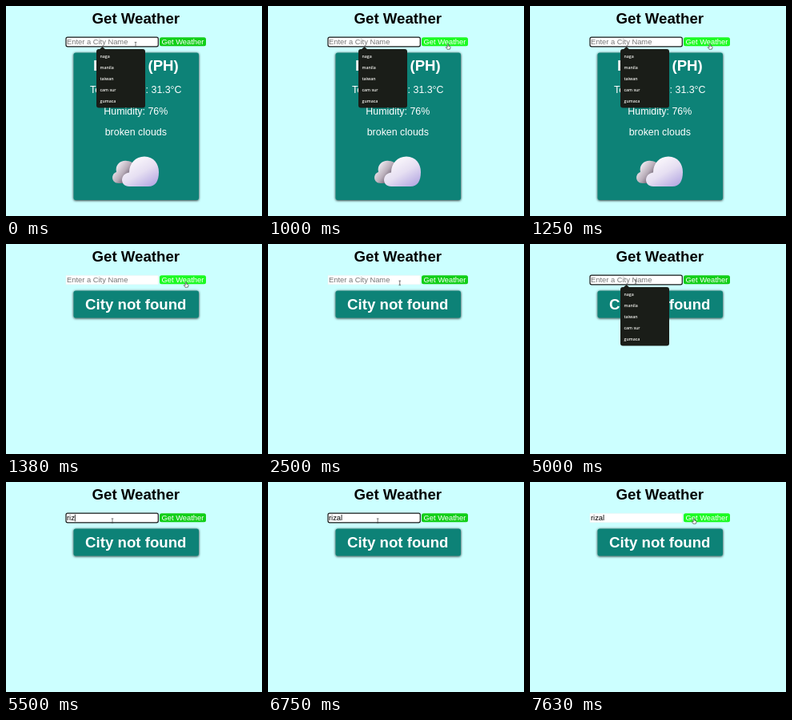
An HTML page for the animation above (8 s loop, 320 px wide and 263 px high).

```html
<!DOCTYPE html>
<html lang="en">
<head>
<meta charset="utf-8">
<title>Get Weather</title>
<style>
  html, body { margin: 0; width: 100%; height: 100%; overflow: hidden; background: #cff; }
  svg { display: block; width: 100vw; height: 100vh; }
  text { font-family: "Liberation Sans", Arial, sans-serif; }
  .big { font-size: 18.67px; font-weight: bold; text-anchor: middle; }
  .mid { font-size: 12.4px; text-anchor: middle; }
  .small { font-size: 9.35px; }
  .light { fill: #fff; }
  .menu { font: 600 5.2px "Open Sans", "Noto Sans", sans-serif; fill: #f4f4f0; }
</style>
</head>
<body>
<svg viewBox="0 0 320 263">
  <defs>
    <filter id="shade" x="-10%" y="-20%" width="120%" height="140%">
      <feDropShadow dx="0" dy="0.6" stdDeviation="1.4" flood-color="#000" flood-opacity="0.9"/>
    </filter>
    <linearGradient id="front" x1="0.1" y1="0" x2="0.85" y2="1">
      <stop offset="0.15" stop-color="#fbf8fc"/>
      <stop offset="0.55" stop-color="#e6dff2"/>
      <stop offset="1" stop-color="#b4a7e2"/>
    </linearGradient>
    <linearGradient id="back" x1="0" y1="0" x2="1" y2="0.7">
      <stop offset="0.2" stop-color="#f1edf3"/>
      <stop offset="0.55" stop-color="#b9adb9"/>
      <stop offset="0.85" stop-color="#594f60"/>
    </linearGradient>
  </defs>
  <rect width="320" height="263" fill="#cff"/>
  <text class="big" x="162.3" y="22.3">Get Weather</text>

  <rect id="card" x="84.5" y="58.5" width="156.5" height="184.5" rx="2.8" fill="#0f8277" filter="url(#shade)"/>
  <g id="weather">
    <text class="big light" x="162.4" y="81.3">Baguio (PH)</text>
    <text class="mid light" x="162.3" y="109.3">Temperature: 31.3°C</text>
    <text class="mid light" x="162.3" y="135.8">Humidity: 76%</text>
    <text class="mid light" x="162.3" y="162.2">broken clouds</text>
    <path fill="url(#back)" d="M141 222 C131 222 131 210 138 208 C136 198 144 193 151 194 C158 194 163 199 163 206 L160 222 Z"/>
    <path fill="url(#front)" d="M154 226 C142 226 142 210 154 208.500 C154 197 162 188.500 173 188.500 C185 188.500 191 198 191 208 C191 219 187 226 178 226 Z"/>
  </g>
  <text id="missing" class="big light" x="162.3" y="82">City not found</text>

  <rect id="field" x="75" y="39.200" width="115.300" height="11.600" fill="#fff"/>
  <text id="entry" class="small" x="76" y="48"></text>
  <rect id="caret" y="40.700" width="0.800" height="8.600"/>
  <rect id="button" x="192" y="39.200" width="58" height="11" rx="2.500"/>
  <text class="small light" x="194.500" y="48">Get Weather</text>

  <g id="menu">
    <path d="M116.500 54.500 l4 -3.600 l4 3.600 z" fill="#1a1d18"/>
    <rect x="113" y="54" width="61" height="73.600" rx="3" fill="#1a1d18"/>
  </g>

  <path id="beam" d="M-1.300 -2.600 H1.300 M0 -2.600 V2.600 M-1.300 2.600 H1.300" fill="none" stroke="#444" stroke-width="0.700"/>
  <path id="hand" d="M-0.800 -3 Q0 -3.700 0.700 -3 V-0.800 L2.600 -0.300 Q3.200 0 3 1 L2.300 3.200 H-1 L-2.700 0.700 Q-2.500 -0.300 -0.800 0.700 Z" fill="#fff" stroke="#222" stroke-width="0.600"/>
</svg>
<script>
const LOOP = 8000, STEP = 125;
const $ = id => document.getElementById(id);
const show = (id, on) => $(id).setAttribute("display", on ? "inline" : "none");
const set = (id, attrs) => {
  for (const key in attrs) $(id).setAttribute(key, attrs[key]);
};

["naga", "manila", "taiwan", "cam sur", "gumaca"].forEach((city, i) => {
  const row = document.createElementNS("http://www.w3.org/2000/svg", "text");
  row.setAttribute("class", "menu");
  row.setAttribute("x", 117.5);
  row.setAttribute("y", 64.8 + 14 * i);
  row.textContent = city;
  $("menu").append(row);
});

// time, x, y
const path = [
  [0, 162, 48], [375, 162, 48], [1000, 225, 51], [2125, 225, 51],
  [2750, 132, 47.5], [5125, 132, 47.5], [5500, 133, 48.5],
  [6625, 133, 48.5], [7500, 208, 49], [7625, 205, 49], [LOOP, 205, 49]
];
const typed = [[5250, "r"], [5375, "ri"], [5500, "riz"], [5875, "riza"], [6125, "rizal"]];

function mouseAt(t) {
  const i = Math.max(1, path.findIndex(p => p[0] > t));
  const [t0, x0, y0] = path[i - 1], [t1, x1, y1] = path[i];
  const k = (t - t0) / (t1 - t0), e = k * k * (3 - 2 * k);
  return [x0 + (x1 - x0) * e, y0 + (y1 - y0) * e];
}

function draw(time) {
  const t = Math.floor(time % LOOP / STEP) * STEP;
  const within = (from, to) => t >= from && t < to;
  const found = t < 1375;
  const focused = found || within(2750, 7500);
  const [x, y] = mouseAt(t);
  const hover = x >= 192;
  const word = typed.reduce((last, [at, text]) => t >= at ? text : last, "");

  show("weather", found);
  show("missing", !found);
  set("card", { height: found ? 184.5 : 34 });
  show("menu", found || within(3000, 5250));
  set("field", {
    rx: focused ? 2 : 0,
    stroke: focused ? "#181818" : "#e6f4f4",
    "stroke-width": focused ? 1.2 : 0.6
  });
  set("button", { fill: hover ? "#1cfb22" : "#12cf18" });

  $("entry").textContent = word || "Enter a City Name";
  set("entry", { fill: word ? "#000" : "#757575" });
  const end = word ? $("entry").getComputedTextLength() : 0;
  set("caret", { x: 76 + end });
  show("caret", within(2750, 3250) || within(5250, 6625) || within(7125, 7500));

  show("beam", !hover);
  show("hand", hover);
  set(hover ? "hand" : "beam", { transform: `translate(${x} ${y})` });
}

const start = performance.now();
function tick() {
  draw(performance.now() - start);
  requestAnimationFrame(tick);
}
tick();
</script>
</body>
</html>
```
